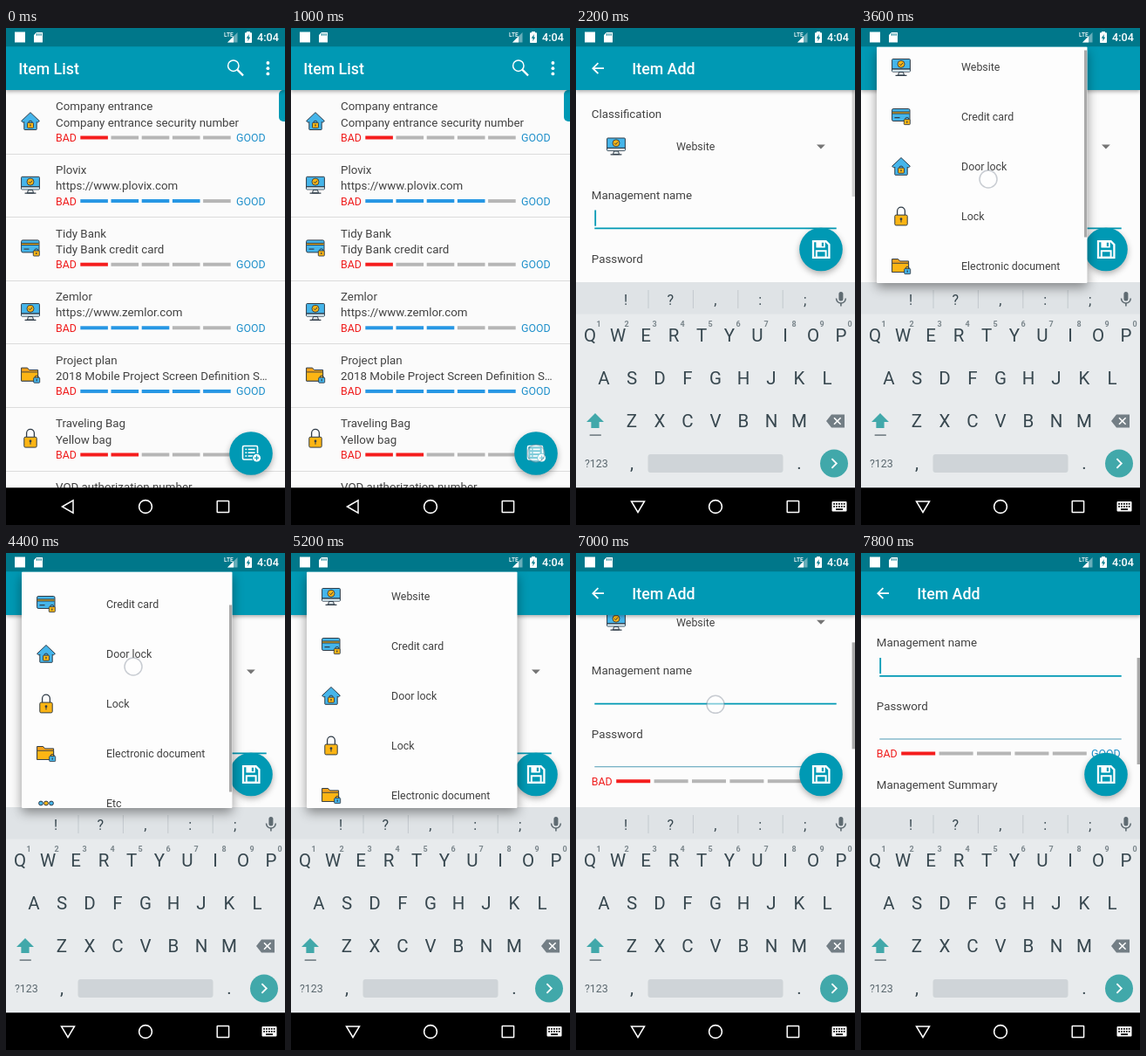
These frames come from a looping animation (320 by 569 pixels, 8 s). An HTML page with a canvas:

```html
<!DOCTYPE html>
<html lang="en">
<head>
<meta charset="utf-8">
<title>Item manager</title>
<style>
html, body { margin: 0; width: 100%; height: 100%; overflow: hidden; background: #000; }
canvas { display: block; width: 100vw; height: 100vh; }
</style>
</head>
<body>
<canvas id="stage"></canvas>
<script>
const W = 320, H = 569, LOOP = 8000, STEP = 200;
const TEAL = '#0099b4', TEXT = '#424242', INK = '#303c48', BLUE = '#45b5ea', GOLD = '#fcb514';
const canvas = document.getElementById('stage');
const c = canvas.getContext('2d');
const dpr = window.devicePixelRatio || 1;
canvas.width = W * dpr;
canvas.height = H * dpr;

// ---- helpers ----
function rect(x, y, w, h, fill, r = 0) {
  c.fillStyle = fill;
  c.beginPath();
  c.roundRect(x, y, w, h, r);
  c.fill();
}
function box(x, y, w, h, fill, r = 0, line = INK, lw = 1) {
  c.beginPath();
  c.roundRect(x, y, w, h, r);
  paint(fill, line, lw);
}
function paint(fill, line, lw = 1) {
  if (fill) { c.fillStyle = fill; c.fill(); }
  if (line) { c.strokeStyle = line; c.lineWidth = lw; c.stroke(); }
}
function poly(points, fill, line, lw, open) {
  c.beginPath();
  points.forEach(([x, y]) => c.lineTo(x, y));
  if (!open) c.closePath();
  paint(fill, line, lw);
}
function disc(x, y, r, fill, line, lw) {
  c.beginPath();
  c.arc(x, y, r, 0, Math.PI * 2);
  paint(fill, line, lw);
}
function text(s, x, y, size = 13.33, color = TEXT, weight = 400, align = 'left') {
  c.font = `${weight} ${size}px Roboto, sans-serif`;
  c.textAlign = align;
  c.fillStyle = color;
  c.fillText(s, x, y);
}
function shadowed(blur, dy, alpha, draw) {
  c.shadowColor = `rgba(0,0,0,${alpha})`;
  c.shadowBlur = blur * dpr;
  c.shadowOffsetY = dy * dpr;
  draw();
  c.shadowColor = 'transparent';
  c.shadowBlur = c.shadowOffsetY = 0;
}
function group(alpha, draw) {
  if (alpha <= 0) return;
  c.save();
  c.globalAlpha = alpha;
  draw();
  c.restore();
}
function clip(x, y, w, h, draw) {
  c.save();
  c.beginPath();
  c.rect(x, y, w, h);
  c.clip();
  draw();
  c.restore();
}
// Linear interpolation through [time, value] pairs
function track(t, keys) {
  if (t <= keys[0][0]) return keys[0][1];
  for (let i = 1; i < keys.length; i++) {
    const [a, u] = keys[i - 1], [b, v] = keys[i];
    if (t <= b) return u + (v - u) * (t - a) / (b - a);
  }
  return keys[keys.length - 1][1];
}
const easeOut = p => 1 - Math.pow(1 - Math.min(1, Math.max(0, p)), 2);

// ---- item icons, centred on 0,0 ----
function smallLock(x, y, body) {
  c.beginPath();
  c.arc(x, y - 1.5, 2.2, Math.PI, 0);
  paint(null, INK, 1);
  box(x - 3.5, y - 1.5, 7, 6, body, 0.8, INK, 0.9);
  rect(x - 0.6, y + 0.4, 1.2, 2.2, INK);
}
const icons = {
  monitor() {
    poly([[-2.5, 6], [2.5, 6], [3.5, 9.6], [-3.5, 9.6]], '#dfe7ea', INK);
    box(-10.4, -9, 20.8, 14.6, BLUE, 1);
    rect(-9.9, 2.8, 19.8, 2.4, '#e4ecef');
    poly([[-10.4, 2.4], [10.4, 2.4]], null, INK, 0.9);
    disc(0, -3.2, 4, GOLD, INK, 0.9);
    poly([[-1.8, -3.2], [-0.4, -1.7], [2, -4.6]], null, INK, 1, true);
    poly([[-6, 9.8], [6, 9.8]], null, INK, 1.2);
  },
  card() {
    box(-10.4, -9, 20.4, 14, BLUE, 1.6);
    rect(-10, -6, 19.6, 3, INK);
    rect(-10, -5, 19.6, 1, GOLD);
    rect(-7.5, 0.6, 6, 1.2, INK);
    smallLock(6.8, 4.6, GOLD);
  },
  house() {
    box(-7.2, -2, 14.4, 11.8, BLUE, 0.6);
    poly([[0, -10], [10.4, -0.2], [8.6, 1.2], [-8.6, 1.2], [-10.4, -0.2]], BLUE, INK);
    rect(-6.6, -0.2, 13.2, 3, BLUE);
    smallLock(0, 3.2, GOLD);
  },
  lock() {
    c.beginPath();
    c.moveTo(-4.4, -1.4);
    c.lineTo(-4.4, -6);
    c.arc(0, -6, 4.4, Math.PI, 0);
    c.lineTo(4.4, -1.4);
    paint(null, INK, 1.3);
    box(-7.2, -1.4, 14.4, 11.8, GOLD, 1.4);
    disc(0, 3.2, 1.4, INK);
    rect(-0.5, 3.8, 1, 3.2, INK);
  },
  folder() {
    poly([[-10.4, 7], [-10.4, -8], [-3.4, -8], [-1.4, -5.6], [8.6, -5.6], [8.6, 7]], '#f5a31a', INK);
    box(-10.4, -3.2, 19, 10.2, GOLD, 0.6, INK, 0.9);
    smallLock(7.2, 4.6, BLUE);
  },
  more() {
    [-6, 0, 6].forEach((x, i) => disc(x, 0, 2.4, i === 1 ? GOLD : BLUE, INK, 1));
  }
};
function icon(name, x, y) {
  c.save();
  c.translate(x, y);
  c.lineJoin = 'round';
  icons[name]();
  c.restore();
}

// ---- shared chrome ----
function meter(x, y, score, start, pitch, width) {
  const color = score > 2 ? '#2797e4' : '#f51d1d';
  text('BAD', x, y + 4.5, 12.4, '#f02020');
  for (let i = 0; i < 5; i++)
    rect(start + i * pitch, y - 2, width, 4, i < score ? color : '#b6b6b6');
  text('GOOD', 264, y + 4.5, 12.4, '#2191cb');
}
function fab(y, drawIcon) {
  shadowed(7, 3, 0.3, () => disc(281, y, 24.8, TEAL));
  c.save();
  c.translate(281, y);
  drawIcon();
  c.restore();
}
function listIcon() {
  box(-9.5, -8.5, 17, 15.5, null, 1.4, '#fff', 1.6);
  [-4.6, -0.8, 3].forEach(y => {
    rect(-6.6, y - 0.8, 1.8, 1.6, '#fff');
    rect(-3.4, y - 0.8, 8, 1.6, '#fff');
  });
  disc(6.6, 5.2, 5.4, TEAL);
  disc(6.6, 5.2, 4.4, '#fff');
  rect(4, 4.6, 5.2, 1.2, TEAL);
  rect(6, 2.6, 1.2, 5.2, TEAL);
}
function saveIcon() {
  poly([[-9, -9.4], [5.6, -9.4], [9.4, -5.6], [9.4, 9.4], [-9, 9.4]], null, '#fff', 2.3);
  rect(-5.6, -9.4, 10.4, 7.4, '#fff', 0.6);
  rect(0.8, -7.8, 2.2, 4.2, TEAL);
  box(-5.2, 1.8, 10.8, 7.4, null, 0, '#fff', 2);
}
function statusBar() {
  rect(0, 0, W, 21.3, '#00778a');
  rect(10, 4.5, 12, 12, '#fff');
  poly([[35, 5], [42, 5], [42, 16.4], [32, 16.4], [32, 8]], '#fff');
  [35, 37.3, 39.6].forEach(x => rect(x, 6.2, 1.1, 2.6, '#00778a'));
  text('LTE', 250, 9.5, 6.6, '#fff', 500);
  poly([[265.5, 5], [265.5, 16.5], [254, 16.5]], 'rgba(255,255,255,.4)');
  poly([[261, 9.5], [261, 16.5], [254, 16.5]], '#fff');
  rect(276, 4, 4, 2, '#fff');
  rect(274, 5.2, 8, 11.8, '#fff', 0.8);
  poly([[278.8, 7], [275.8, 11.8], [277.7, 11.8], [277.2, 15.2], [280.2, 10.4], [278.3, 10.4]], '#00778a');
  text('4:04', 288, 15.4, 12.6, '#fff', 500);
}
function appBar() {
  shadowed(4, 1.5, 0.3, () => rect(0, 21, W, 50.1, TEAL));
}
function navBar(typing) {
  rect(0, 526.3, W, 43, '#000');
  poly(typing ? [[63.5, 542], [78.5, 542], [71, 554.5]] : [[64.5, 548], [77, 540.8], [77, 555.2]], null, '#fff', 1.5);
  disc(160, 548, 7.4, null, '#fff', 1.6);
  box(242.2, 541.4, 13.4, 13.2, null, 0.5, '#fff', 1.5);
  if (!typing) return;
  rect(293.5, 542, 17, 11.6, '#fff', 1);
  for (let row = 0; row < 2; row++)
    for (let i = 0; i < 5; i++) rect(295.2 + i * 2.9, 544 + row * 3, 1.7, 1.7, '#000');
  rect(298, 550.2, 8, 1.7, '#000');
}
function touch(x, y) {
  disc(x, y, 10, 'rgba(255,255,255,.5)', 'rgba(120,130,145,.4)', 1.5);
}

// ---- list page ----
const items = [
  ['house', 'Company entrance', 'Company entrance security number', 1],
  ['monitor', 'Plovix', 'https://www.plovix.com', 4],
  ['card', 'Tidy Bank', 'Tidy Bank credit card', 1],
  ['monitor', 'Zemlor', 'https://www.zemlor.com', 3],
  ['folder', 'Project plan', '2018 Mobile Project Screen Definition S…', 5],
  ['lock', 'Traveling Bag', 'Yellow bag', 2],
  ['monitor', 'VOD authorization number', '', 3]
];
function listPage() {
  rect(0, 71, W, 456, '#fbfbfb');
  items.forEach(([kind, title, note, score], i) => {
    const y = 89.5 + i * 72.6;
    text(title, 57, y + 4.8);
    if (i < 6) {
      text(note, 57, y + 23);
      icon(kind, 28, y + 17.2);
      meter(57, y + 36, score, 85.3, 35.2, 31.6);
      rect(0, Math.round(y + 54), W, 1, '#dcdcdc');
    }
  });
  rect(313, 71, 12, 36, TEAL, 5);
  fab(487, listIcon);
  appBar();
  text('Item List', 14.2, 53, 17.8, '#fff', 500);
  disc(260.8, 43.2, 6.2, null, '#fff', 1.5);
  poly([[265.2, 47.6], [272, 54.4]], null, '#fff', 2.2);
  [40, 46.2, 52.4].forEach(y => disc(300.4, y, 1.9, '#fff'));
}

// ---- form page ----
function formTitle() {
  poly([[32, 46.2], [19.5, 46.2]], null, '#fff', 1.8);
  poly([[25.4, 40.2], [19.4, 46.2], [25.4, 52.2]], null, '#fff', 1.8, true);
  text('Item Add', 64.2, 53, 17.8, '#fff', 500);
}
function formBody(scroll, cursor) {
  c.save();
  c.translate(0, -scroll);
  text('Classification', 17.8, 103.2);
  icon('monitor', 46, 135);
  text('Website', 115, 140.3, 12.4);
  poly([[276, 133.4], [285.8, 133.4], [280.9, 138.4]], '#757575');
  text('Management name', 17.8, 195.8);
  rect(21.3, 228.4, 277.4, 1.8, TEAL);
  if (cursor) rect(21.3, 208.5, 1.8, 18.2, TEAL);
  text('Password', 17.8, 268.5);
  text('Management Summary', 17.8, 358.7);
  text('Account(Email)', 17.8, 431.6);
  [301, 391, 463].forEach(y => rect(21.3, y, 277.4, 0.9, '#4f9bb5'));
  meter(17.8, 318, 1, 46.2, 43.4, 39);
  c.restore();
}
function formPage(scroll, cursor, bar, lift) {
  rect(0, 71, W, 456, '#fcfcfc');
  clip(0, 71, W, 455, () => formBody(scroll, cursor));
  group(bar, () => rect(316.6, 71 + scroll * 0.554, 3.4, 122, '#a9a9a9'));
  fab(487 - lift * 233.5, saveIcon);
  appBar();
  formTitle();
}

// ---- keyboard ----
function keyRow(keys, x, y) {
  [...keys].forEach((k, i) => text(k, x + i * 32, y, 20.5, '#37474f', 400, 'center'));
}
function keyboard(lift) {
  clip(0, 291, W, 236, () => {
    c.translate(0, (1 - lift) * 235);
    rect(0, 291, W, 236, '#e8ebed');
    rect(0, 291, W, 36.5, '#dfe3e6');
    [...'!?,:;'].forEach((k, i) => {
      text(k, 57 + i * 51.4, 317, 16, '#37474f', 400, 'center');
      if (i < 4) rect(82.5 + i * 51.4, 300, 1, 21, '#c3c9cd');
    });
    rect(301.4, 302, 5, 10.4, '#5f6b72', 2.5);
    c.beginPath();
    c.arc(303.9, 309.6, 5.4, 0, Math.PI);
    paint(null, '#5f6b72', 1.5);
    rect(303.1, 315, 1.6, 3.6, '#5f6b72');

    keyRow('QWERTYUIOP', 16, 359.3);
    [...'1234567890'].forEach((k, i) => text(k, 26 + i * 32, 341.8, 9, '#7b868c', 700, 'center'));
    keyRow('ASDFGHJKL', 32, 408.3);
    keyRow('ZXCVBNM', 64, 457.3);
    poly([[22, 441], [32, 451], [26.6, 451], [26.6, 458], [17.4, 458], [17.4, 451], [12, 451]], '#41a8aa');
    rect(15.5, 465.2, 13.5, 1.8, '#7b868c', 0.8);
    poly([[287, 450], [293, 442.6], [308, 442.6], [308, 457.4], [293, 457.4]], '#737e85');
    poly([[296, 446.2], [303.6, 453.8]], null, '#fff', 1.6);
    poly([[303.6, 446.2], [296, 453.8]], null, '#fff', 1.6);
    text('?123', 10, 503, 12.4, '#59666d');
    text(',', 64, 505, 20.5, '#37474f', 400, 'center');
    rect(82.5, 488, 155, 21, '#cfd4d8', 3);
    text('.', 256, 505, 20.5, '#37474f', 400, 'center');
    disc(296, 498.5, 16, '#41a8aa');
    poly([[293.4, 493.2], [298.8, 498.5], [293.4, 503.8]], null, '#fff', 1.8, true);
  });
}

// ---- drop-down ----
const kinds = [
  ['monitor', 'Website'], ['card', 'Credit card'], ['house', 'Door lock'],
  ['lock', 'Lock'], ['folder', 'Electronic document'], ['more', 'Etc']
];
function popup(scroll, bar, pressed) {
  shadowed(13, 5, 0.42, () => rect(18, 21.5, 241.5, 270.5, '#fdfdfd', 1));
  clip(18, 21.5, 241.5, 270.5, () => {
    if (pressed) rect(18, 21.5, 241.5, 57, '#e2e2e2');
    kinds.forEach(([kind, label], i) => {
      const y = 49.5 + i * 57 - scroll;
      icon(kind, 46, y);
      text(label, 115, y + 4.5, 12.4);
    });
    group(c.globalAlpha * bar, () => rect(256, 21.5 + scroll * 0.79, 3.4, 214, '#a9a9a9'));
  });
}

// ---- timeline ----
function draw(t) {
  c.setTransform(canvas.width / W, 0, 0, canvas.height / H, 0, 0);
  c.clearRect(0, 0, W, H);
  if (t < 1600) {
    listPage();
    navBar(t >= 1400);
    if (t === 1000) touch(281, 487);
    group(track(t, [[1000, 0], [1200, 0.1], [1400, 0.47]]), () => rect(0, 21, W, 548, '#fff'));
    if (t >= 1400) group(0.12, () => { formBody(0, true); formTitle(); });
  } else {
    const lift = track(t, [[1600, 0], [1800, 0.7], [2000, 1]]);
    const scroll = 88.5 * easeOut((t - 6600) / 1000);
    const cursor = t < 5600 ? t < 2500 : Math.floor(t / 500) % 2 === 1;
    const bar = t < 5000
      ? track(t, [[1600, 0], [1800, 1], [2000, 1], [2200, 0.5], [2400, 0]])
      : track(t, [[6600, 0], [6800, 1]]);
    formPage(scroll, cursor, bar, lift);
    keyboard(lift);
    navBar(true);
    if (t === 2600) touch(160, 137);
    const open = track(t, [[2600, 0], [2800, 0.6], [3000, 1], [5800, 1], [6000, 0.35], [6200, 0]]);
    const menuScroll = track(t, [[3400, 0], [3600, 5], [3800, 38], [4000, 68], [4200, 72],
      [4400, 48], [4600, 18], [4800, 3], [5000, 0]]);
    const menuBar = track(t, [[3400, 0], [3600, 1], [4800, 1], [5000, 0.5], [5200, 0]]);
    group(open, () => popup(menuScroll, menuBar, t === 5800));
    if (t >= 3600 && t <= 4600) touch(146, 178 - menuScroll);
    if (t === 5600) touch(146, 51);
    if (t >= 6600 && t <= 7200) touch(160, 230 - scroll);
  }
  statusBar();
}
function frame(now) {
  draw(Math.floor((now % LOOP) / STEP) * STEP);
  requestAnimationFrame(frame);
}
requestAnimationFrame(frame);
</script>
</body>
</html>
```
